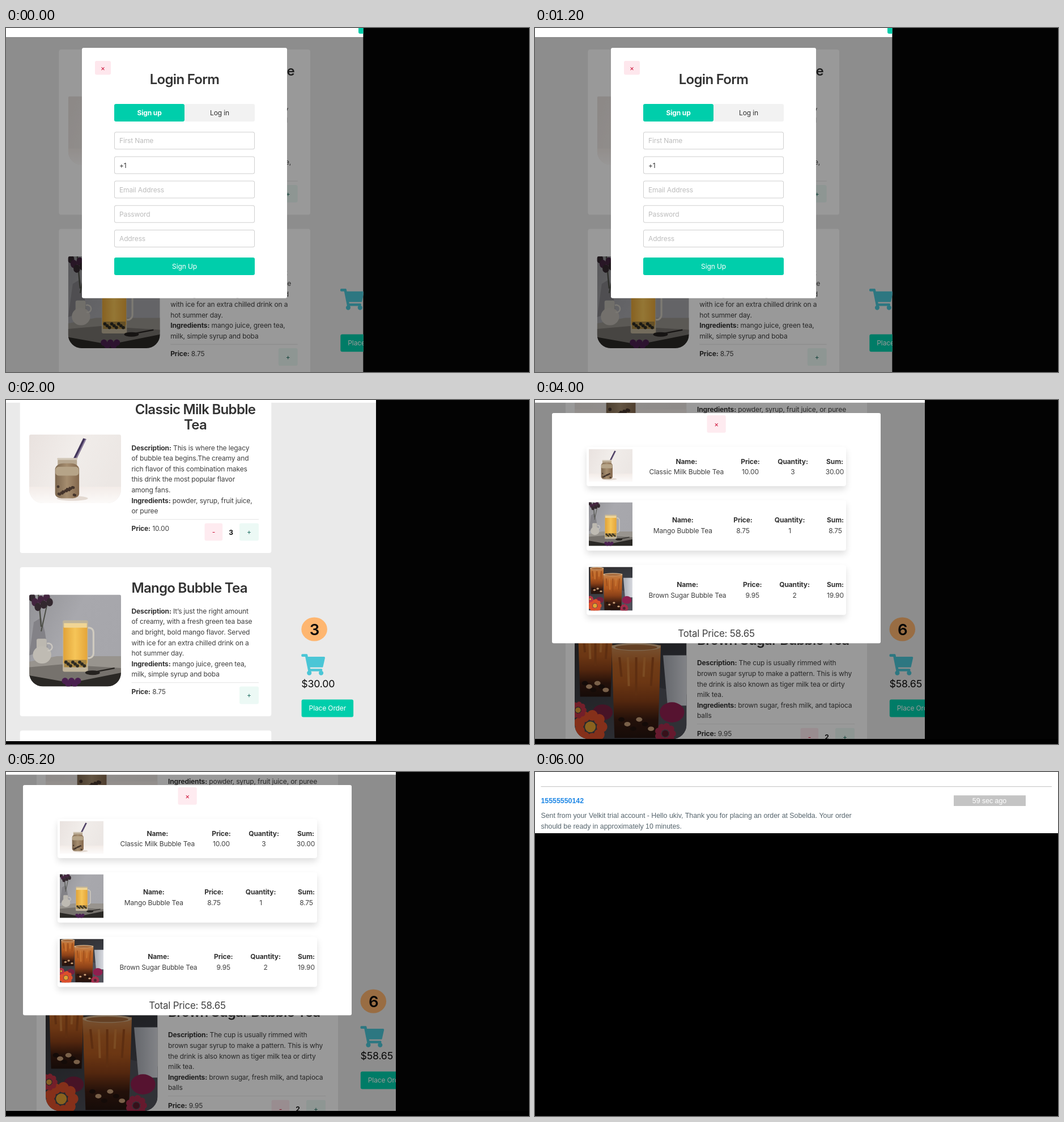
Recreate the animation shown at these times as an HTML page with a canvas. Size 923 by 607 pixels, loop 8 s.

```html
<!DOCTYPE html>
<html lang="en">
<head>
<meta charset="utf-8">
<title>Bubble tea order</title>
<style>
  html, body { margin: 0; width: 100%; height: 100%; overflow: hidden; background: #000; }
  canvas { display: block; }
</style>
</head>
<body>
<canvas id="stage" width="923" height="607"></canvas>
<script>
const W = 923, H = 607, HOLD = 2000;
const ctx = document.getElementById('stage').getContext('2d');

const TEAL = '#00ceab', PINK = '#feebf0', RED = '#cc0f35', MINT = '#ecf9f5';
const GREEN = '#1f6f62', INK = '#323232', BODY = '#404040', PAGE = '#eaeaea';
const SANS = 'Inter, "Open Sans", sans-serif';

// ---- basic helpers ----
function rect(x, y, w, h, fill, r = 0) {
  ctx.fillStyle = fill;
  ctx.beginPath();
  ctx.roundRect(x, y, w, h, r);
  ctx.fill();
}

// y is the middle of the letters; returns the advance width
function text(str, x, y, { size = 12.4, weight = 400, color = BODY, align = 'left' } = {}) {
  const px = size * 0.97;
  ctx.font = `${weight} ${px}px ${SANS}`;
  ctx.letterSpacing = (px * (size > 22 ? -0.03 : -0.0115)).toFixed(3) + 'px';
  ctx.textAlign = align;
  ctx.fillStyle = color;
  ctx.fillText(str, x, y + size * 0.36);
  return ctx.measureText(str).width;
}

function title(str, x, y, align = 'left') {
  text(str, x, y, { size: 24.8, weight: 600, color: INK, align });
}

// "Label:|rest" sets the label in bold
function line(str, x, y) {
  const [a, b] = str.split('|');
  if (b === undefined) return text(a, x, y);
  const w = text(a, x, y, { weight: 700, color: INK });
  text(b, x + w, y);
}

function button(x, y, w, h, fill, label, color, weight = 400) {
  rect(x, y, w, h, fill, 3);
  text(label, x + w / 2, y + h / 2, { color, weight, align: 'center' });
}

function dot(fill, x, y, rx, ry = rx) {
  ctx.fillStyle = fill;
  ctx.beginPath();
  ctx.ellipse(x, y, rx, ry, 0, 0, 7);
  ctx.fill();
}

function poly(fill, ...p) {
  ctx.fillStyle = fill;
  ctx.beginPath();
  for (let i = 0; i < p.length; i += 2) ctx.lineTo(p[i], p[i + 1]);
  ctx.fill();
}

function stroke(color, width, ...p) {
  ctx.strokeStyle = color;
  ctx.lineWidth = width;
  ctx.beginPath();
  for (let i = 0; i < p.length; i += 2) ctx.lineTo(p[i], p[i + 1]);
  ctx.stroke();
}

function fade(x0, y0, x1, y1, ...colors) {
  const g = ctx.createLinearGradient(x0, y0, x1, y1);
  colors.forEach((c, i) => g.addColorStop(i / (colors.length - 1), c));
  return g;
}

function flower(color, core, x, y, r) {
  for (let i = 0; i < 9; i++) {
    const a = i * Math.PI / 4.5;
    dot(color, x + Math.cos(a) * r * 0.65, y + Math.sin(a) * r * 0.65, r * 0.3);
  }
  dot(core, x, y, r * 0.3);
}

// ---- pictures, drawn in a unit square ----
const pictures = {
  classic() {
    rect(0, 0, 1, 1, fade(0, 0, 1, 0.3, '#e9e2df', '#f1edea', '#ece7e4'));
    rect(0, 0.76, 1, 0.24, fade(0, 0.76, 0, 1, '#f3ecе8'.replace('е', 'e'), '#fcfaf9'));
    dot('#e3d9d1', 0.47, 0.93, 0.17, 0.035);
    stroke('#43365a', 0.036, 0.605, 0.06, 0.48, 0.4);
    stroke('#a593b4', 0.008, 0.613, 0.07, 0.494, 0.39);
    rect(0.31, 0.35, 0.21, 0.16, '#b7a790', 0.03);
    rect(0.282, 0.42, 0.262, 0.51, fade(0.28, 0, 0.54, 0, '#7c664e', '#a58d6f', '#85694e'), [0.09, 0.09, 0.07, 0.07]);
    rect(0.286, 0.47, 0.254, 0.13, '#b6a488', 0.04);
    for (let i = 0; i < 18; i++)
      dot('#44342b', 0.315 + (i * 0.618 % 1) * 0.195, 0.76 + (i * 0.37 % 1) * 0.13, 0.015, 0.02);
    rect(0.305, 0.34, 0.22, 0.03, '#d3c9ba', 0.01);
  },
  mango() {
    rect(0, 0, 1, 1, fade(0, 0, 1, 0.5, '#929296', '#a8a8ad', '#a6a6ab'));
    poly('#838287', 0.05, 0.3, 0.13, 0.25, 0.17, 0.4, 0.2, 0.6, 0, 0.66);
    stroke('#4b4d45', 0.015, 0.1, 0, 0.13, 0.35);
    stroke('#4b4d45', 0.012, 0.2, 0.08, 0.13, 0.4);
    for (let i = 0; i < 7; i++)
      dot(i % 2 ? '#43243f' : '#33282f', 0.03 + i * 0.032, 0.03 + (i * 0.4 % 1) * 0.13, 0.036, 0.045);
    poly('#98948e', 0, 0.73, 0.3, 0.67, 1, 0.67, 1, 0.82, 0.48, 0.96, 0, 0.88);
    poly('#76726d', 0, 0.79, 0.35, 0.76, 1, 0.8, 1, 0.86, 0.45, 0.97, 0, 0.89);
    poly('#2a2825', 0, 0.88, 0.45, 0.96, 1, 0.85, 1, 1, 0, 1);
    rect(0.08, 0.48, 0.11, 0.12, '#bcb8b0', 0.02);
    dot('#bfbbb3', 0.14, 0.655, 0.1, 0.095);
    ctx.strokeStyle = '#cbc7c0';
    ctx.lineWidth = 0.015;
    ctx.beginPath();
    ctx.arc(0.21, 0.57, 0.04, -2, 1.8);
    ctx.stroke();
    ctx.strokeStyle = '#cfcabf';
    ctx.lineWidth = 0.02;
    ctx.beginPath();
    ctx.roundRect(0.6, 0.36, 0.1, 0.33, 0.07);
    ctx.stroke();
    rect(0.365, 0.28, 0.275, 0.56, '#bfb39a', 0.02);
    rect(0.372, 0.35, 0.26, 0.4, fade(0.37, 0, 0.63, 0, '#e0a238', '#f6c558', '#e5a63a'), 0.01);
    rect(0.378, 0.31, 0.25, 0.05, '#f0d595');
    rect(0.38, 0.71, 0.245, 0.08, '#a88642');
    for (let i = 0; i < 9; i++)
      dot('#2d2b23', 0.4 + i * 0.025, 0.735 + (i % 3) * 0.02, 0.018);
    dot('#25221f', 0.69, 0.85, 0.08, 0.025);
    stroke('#25221f', 0.015, 0.72, 0.84, 0.93, 0.8);
    for (let i = 0; i < 5; i++) dot('#4a2050', 0.39 + i * 0.035, 0.94 + (i % 2) * 0.03, 0.035);
  },
  brown() {
    rect(0, 0, 1, 1, fade(0, 0, 0.4, 1, '#302c2c', '#383a40', '#4a4b54'));
    poly('#50515a', 0.6, 0.5, 1, 0.6, 1, 1, 0.5, 1);
    const glass = (x, y, w, h) => {
      poly(fade(0, y, 0, y + h, '#c78a55', '#bb6527', '#b25a20', '#8a4018', '#3a1b10', '#24130e'),
        x, y, x + w, y, x + w * 0.94, y + h, x + w * 0.06, y + h);
      dot('#d3b08a', x + w / 2, y + 0.015, w / 2, 0.035);
      dot('#a66a3c', x + w / 2, y + 0.02, w * 0.43, 0.024);
      for (let i = 0; i < 5; i++)
        stroke(i % 2 ? '#cd7c38' : '#9a4c1c', 0.02,
          x + w * (0.16 + i * 0.17), y + h * 0.13, x + w * (0.2 + i * 0.15), y + h * (0.34 + i % 3 * 0.1));
      for (let i = 0; i < 6; i++)
        dot(i % 2 ? '#c9a079' : '#21120e', x + w * (0.2 + i * 0.12), y + h * (0.8 + i % 3 * 0.05), 0.028, 0.02);
    };
    glass(0.03, 0.02, 0.31, 0.6);
    poly(fade(0.8, 0, 1, 0, '#a9adb5', '#d8dae0'), 0.79, 0.25, 1, 0.25, 1, 0.7, 0.83, 0.7);
    dot('#8f1f4f', 0.87, 0.76, 0.11, 0.09);
    dot('#76203f', 0.25, 0.76, 0.09, 0.07);
    glass(0.33, 0.16, 0.44, 0.83);
    flower('#dd4f2b', '#e6a332', 0.14, 0.89, 0.16);
    flower('#bf3345', '#e09a38', 0.03, 0.74, 0.08);
    flower('#a92c4c', '#5b1a2c', 0.81, 0.95, 0.1);
  }
};

function photo(name, x, y, w, h, r = 0) {
  ctx.save();
  ctx.beginPath();
  ctx.roundRect(x, y, w, h, r ? [3, 3, r, r] : 0);
  ctx.clip();
  ctx.translate(x, y);
  ctx.scale(w, h);
  pictures[name]();
  ctx.restore();
}

// ---- shop page ----
const narrow = { x: 24.7, w: 443.6, text: 221.5, right: 446 };
const wide = { x: 54, w: 532, text: 286, right: 564 };

const classicLines = [
  'Description:| This is where the legacy', 'of bubble tea begins.The creamy and',
  'rich flavor of this combination makes', 'this drink the most popular flavor', 'among fans.',
  'Ingredients:| powder, syrup, fruit juice,', 'or puree'];
const mangoLines = [
  'Description:| It’s just the right amount', 'of creamy, with a fresh green tea base',
  'and bright, bold mango flavor. Served', 'with ice for an extra chilled drink on a', 'hot summer day.',
  'Ingredients:| mango juice, green tea,', 'milk, simple syrup and boba'];
const brownLines = [
  'Description:| The cup is usually rimmed with', 'brown sugar syrup to make a pattern. This is why',
  'the drink is also known as tiger milk tea or dirty', 'milk tea.',
  'Ingredients:| brown sugar, fresh milk, and tapioca', 'balls'];

function card(lay, y, h) {
  rect(lay.x, y, lay.w, h, '#fff', 4);
}

function details(lay, y, lines, price, qty) {
  lines.forEach((s, i) => line(s, lay.text, y + i * 18.57));
  const end = y + (lines.length - 1) * 18.57, top = end + 21.8, r = lay.right;
  rect(lay.text, end + 14.3, r - lay.text, 1.2, '#e9e9e9');
  line('Price:| ' + price, lay.text, end + 31.2);
  button(r - 34, top, 34, 30.8, MINT, '+', GREEN);
  if (qty) {
    button(r - 95.5, top, 31.7, 30.8, PINK, '-', RED);
    text(qty, r - 49, top + 15.8, { weight: 700, color: '#111', align: 'center' });
  }
}

function shopNarrow(qty) {
  card(narrow, -21.5, 291.5);
  photo('classic', 41, 61, 162, 121, 24);
  title('Classic Milk Bubble', 334, 16, 'center');
  title('Tea', 334, 43.5, 'center');
  details(narrow, 84.3, classicLines, '10.00', qty);
  card(narrow, 295, 263);
  photo('mango', 41, 343.5, 162, 162, 24);
  title('Mango Bubble Tea', narrow.text, 331.5);
  details(narrow, 372.4, mangoLines, '8.75');
  card(narrow, 583.3, 263);
}

const cartPath = new Path2D('M528 301l47-208c4-15-8-29-23-29H159l-9-45C148 8 138 0 126 0H24C11 0 0 11 0 24v16c0 13 11 24 24 24h70l70 343c-17 10-28 28-28 49 0 31 25 56 56 56s56-25 56-56c0-16-6-30-17-40h210c-10 10-17 24-17 40 0 31 25 56 56 56s56-25 56-56c0-22-13-41-31-50l5-24c3-15-8-29-23-29H218l-7-32h294c11 0 21-8 23-19z');

function cart(x, y, count, sum) {
  if (count) {
    dot('#feb670', x + 22.8, y - 43.7, 22.8, 21);
    text(count, x + 22.8, y - 43.5, { size: 28.5, weight: 600, color: '#0a0a0a', align: 'center' });
    text(sum, x, y + 52, { size: 18.3, color: '#0a0a0a' });
  }
  ctx.save();
  ctx.translate(x, y);
  ctx.scale(0.0725, 0.0735);
  ctx.fillStyle = '#4bc6d6';
  ctx.fill(cartPath);
  ctx.restore();
  button(x + 0.3, y + 80.4, 91.5, 30.8, TEAL, 'Place Order', '#fff');
}

// page area with a white bar on top, black around it
function page(w, bar, bottom, draw, dim = 0) {
  rect(0, 0, W, H, '#030303');
  rect(0, bottom, W, H - bottom, '#000');
  ctx.save();
  ctx.beginPath();
  ctx.rect(0, 0, w, bottom);
  ctx.clip();
  rect(0, 0, w, bottom, PAGE);
  draw();
  if (dim) rect(0, 0, w, H, `rgba(0,0,0,${dim})`);
  rect(0, 0, w, bar, '#fff');
  ctx.restore();
}

// ---- scenes ----
function login() {
  page(630.5, 16, H, () => {
    ctx.save();
    ctx.translate(68.7, 59.5);
    shopNarrow();
    ctx.restore();
    cart(590, 460, 0);
  }, 0.4);
  rect(622, -20, 8.5, 30, TEAL, [0, 0, 0, 3]);

  rect(134, 35, 362, 441.7, '#fff', 3);
  rect(157, 58, 28, 24.5, '#fee7ed', 3);
  text('×', 171, 70.5, { color: RED, align: 'center' });
  title('Login Form', 315, 90, 'center');
  rect(315, 134, 124, 31, '#f2f2f2', 3);
  text('Log in', 377, 149.7, { color: INK, align: 'center' });
  button(191, 134, 124, 31, TEAL, 'Sign up', '#fff', 700);
  ['First Name', '+1', 'Email Address', 'Password', 'Address'].forEach((s, i) => {
    const y = 183.2 + i * 43.2;
    rect(191, y, 248, 31, '#cfcfcf', 3.5);
    rect(192, y + 1, 246, 29, '#fff', 2.5);
    text(s, 200, y + 15.8, { color: i === 1 ? '#333' : '#bdbdbd' });
  });
  button(191, 405, 248, 31, TEAL, 'Sign Up', '#fff');
}

function shop() {
  page(653, 4.7, 602, () => {
    shopNarrow('3');
    cart(521.3, 448.2, '3', '$30.00');
  });
}

function orderRow(y, h, name, pic, picH, xs, cells) {
  ctx.shadowColor = 'rgba(10,10,10,.13)';
  ctx.shadowBlur = 12;
  ctx.shadowOffsetY = 6;
  rect(91, y, 458, h, '#fff', 4);
  ctx.shadowColor = 'transparent';
  photo(pic, 95, y + 3.4, 77, picH);
  const mid = y + h / 2;
  ['Name:', 'Price:', 'Quantity:', 'Sum:'].forEach((s, i) => {
    text(s, xs[i], mid - 9.4, { weight: 700, color: INK, align: 'center' });
    text([name, ...cells][i], xs[i], mid + 9.2, { align: 'center' });
  });
}

function summary() {
  page(688, 4.7, 598, () => {
    card(wide, -140, 235);
    photo('classic', 70, -96, 197.5, 148, 24);
    line('Ingredients:| powder, syrup, fruit juice, or puree', wide.text, 16.8);
    card(wide, 380, 300);
    photo('brown', 70, 401, 197.5, 197.5, 26);
    title('Brown Sugar Bubble Tea', wide.text, 423.5);
    details(wide, 464, brownLines, '9.95', '2');
    cart(625.5, 448.2, '6', '$58.65');
  }, 0.4);

  rect(30, 23, 580, 406.3, '#fff', 3);
  button(303.5, 27, 33.3, 30.7, PINK, '×', RED);
  orderRow(83, 69, 'Classic Milk Bubble Tea', 'classic', 57, [267.3, 380, 455, 529], ['10.00', '3', '30.00']);
  orderRow(177, 88.8, 'Mango Bubble Tea', 'mango', 77, [260.8, 367, 449.5, 530], ['8.75', '1', '8.75']);
  orderRow(291, 88.3, 'Brown Sugar Bubble Tea', 'brown', 77, [269, 383.7, 458, 530], ['9.95', '2', '19.90']);
  text('Total Price: 58.65', 320, 411.8, { size: 17.4, align: 'center' });
}

function message() {
  rect(0, 0, W, H, '#000');
  rect(0, 0, W, 108, '#fff');
  rect(10.5, 25, 901.5, 1.2, '#cccccc');
  rect(739, 41.3, 127, 18.6, '#c4c4c4');
  const put = (s, x, y, color, weight = 400, align = 'left') => {
    ctx.font = `${weight} 12.35px "Liberation Sans", Arial, sans-serif`;
    ctx.letterSpacing = '0px';
    ctx.textAlign = align;
    ctx.fillStyle = color;
    ctx.fillText(s, x, y);
  };
  put('15555550142', 10.5, 54.6, '#1e87e5', 700);
  put('59 sec ago', 802, 54.8, '#fff', 400, 'center');
  put('Sent from your Velkit trial account - Hello ukiv, Thank you for placing an order at Sobelda. Your order', 10.5, 81, '#56656d');
  put('should be ready in approximately 10 minutes.', 10.5, 99.6, '#56656d');
}

// ---- loop ----
const scenes = [login, shop, summary, message];
const start = performance.now();
let shown = -1;

function tick() {
  const i = Math.floor((performance.now() - start) / HOLD) % scenes.length;
  if (i !== shown) scenes[shown = i]();
  requestAnimationFrame(tick);
}
tick();
</script>
</body>
</html>
```
